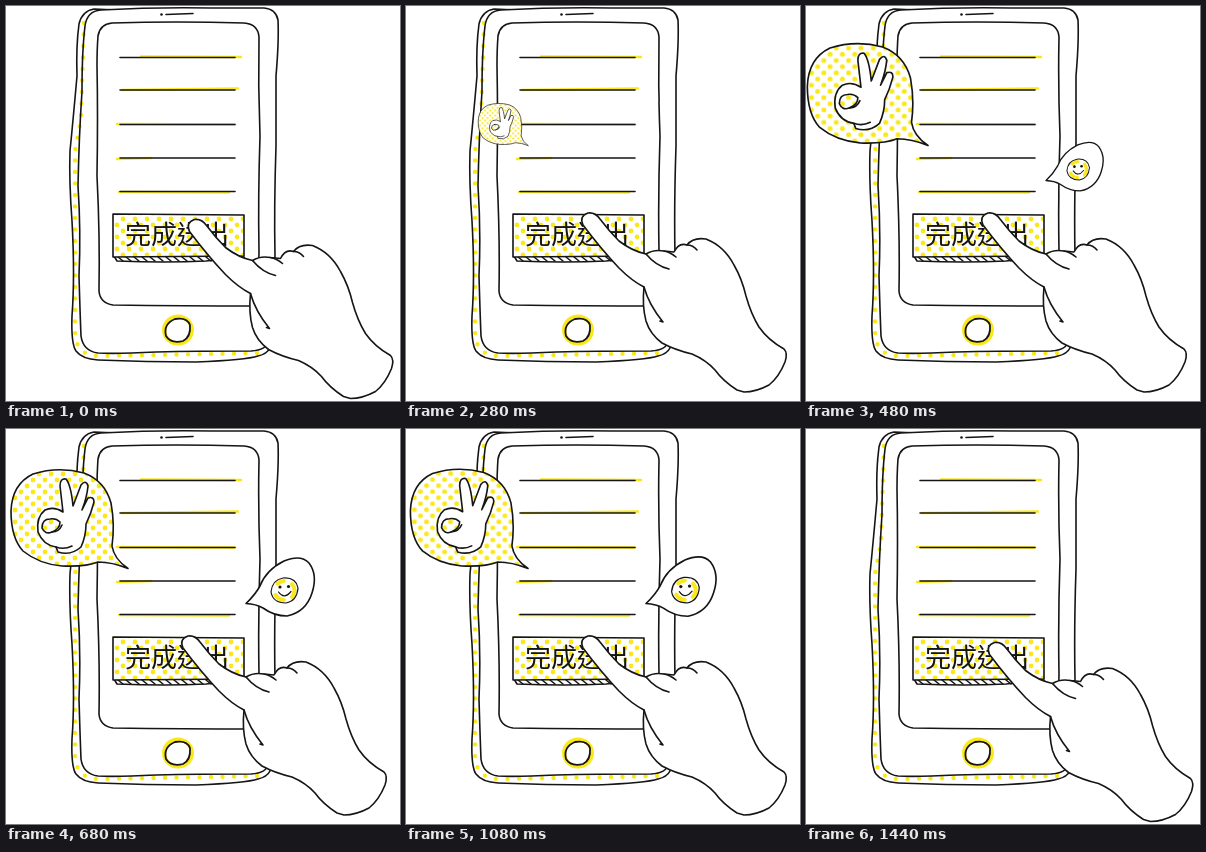
Animation of 394 by 395 pixels, one loop 1840 ms. Source, as an HTML page:

```html
<!DOCTYPE html>
<html lang="zh-Hant">
<head>
<meta charset="utf-8">
<style>
html, body { margin: 0; width: 100%; height: 100%; overflow: hidden; background: #fff; }
svg { display: block; width: 394px; height: 395px; }
.ink { fill: none; stroke: #151515; stroke-width: 1.6; stroke-linecap: round; stroke-linejoin: round; }
.white { fill: #fff; }
.dots { fill: url(#dots); }
.solid { fill: #151515; }
.mark { fill: none; stroke: #fbe81a; stroke-width: 2.5; stroke-linecap: round; }
.beads { stroke-width: 4.4; stroke-dasharray: 0 11.5; mix-blend-mode: multiply; }
.ring { stroke-width: 4; }
.thin { stroke-width: 1.2; }
text { font: 300 26px "Noto Sans CJK TC", "Noto Sans CJK", "Noto Sans CJK JP", sans-serif; fill: #151515; }
</style>
</head>
<body>
<svg viewBox="0 0 394 395">
  <defs>
    <pattern id="dots" width="12" height="12" patternUnits="userSpaceOnUse" fill="#fbe81a">
      <circle cx="3" cy="3" r="2.4"/><circle cx="9" cy="9" r="2.4"/>
    </pattern>
  </defs>

  <!-- phone -->
  <path class="ink white" d="M88 3Q76 5 73 18Q70 40 71 70Q67 115 64 145Q63 175 66 215Q69 270 66 310Q65 338 70 345Q76 353 92 354Q140 356 190 356Q240 354 252 350Q261 348 264 342L250 10Z"/>
  <path class="ink white" d="M95 4Q150 1 205 2L258 2Q270 3 272 14Q273 35 270 70Q270 105 270 140Q268 200 269 250L262 335Q261 344 245 345Q190 345 150 346Q110 348 92 347Q77 345 75 330Q74 305 73 270Q75 225 72 180Q73 130 76 85Q76 45 79 20Q81 5 95 4Z"/>
  <path class="mark beads" d="M78 17L75 113L69 145V325Q69 349 92 350L255 347"/>
  <path class="ink white" d="M106 17Q170 15 238 17Q252 18 253 31Q252 80 254 130Q252 190 253 245L252 300Q175 300 107 299Q94 297 93 285Q94 230 91 170Q92 110 91 60Q91 43 92 30Q94 18 106 17Z"/>
  <circle class="solid" cx="155.5" cy="8.5" r="1.3"/>
  <path class="ink" d="M160 8.5L187 7.5"/>

  <path class="mark" d="M135 50.5L235 51M116 84L232 82.500M111 118L229 118.5M111 153L145 152M113 186L223 186.5"/>
  <path class="ink" d="M114 51.5H229M114 84H229M114 118.5H229M114 152H229M114 185.5H229"/>

  <ellipse class="mark ring" cx="172" cy="324" rx="14" ry="13.5"/>
  <path class="ink" style="stroke-width:1.8" d="M169 313Q181 311 184 319Q185 331 177 335Q165 338 160 330Q157 318 169 313Z"/>

  <!-- button -->
  <path class="ink white" d="M108 250L111 255Q160 257 200 255L238 251"/>
  <path class="ink" id="hatch"/>
  <path class="white" d="M107 208L238 209V250L107 251Z"/>
  <path class="ink dots" d="M107 208L238 209V250L107 251Z"/>
  <text x="119" y="238">完成送出</text>

  <!-- bubble with the OK sign -->
  <g id="left">
    <path id="cloud" class="white" d="M122 139.500Q108 130 106 117Q109 96 105 74Q99 52 78 44Q52 37 27 45Q6 55 5 82Q5 109 17 122Q33 135 56 137Q80 138 92 133Q106 133 122 139.500Z"/>
    <path id="cloudInk" class="ink dots"/>
    <path class="ink white" fill-rule="evenodd" d="M57 83L54 57Q54 49 60 50Q65 56 67 77L75 56Q80 50 82 57Q81 68 76 81L82 69Q88 67 88 73Q85 85 80 95Q80 107 75 118Q65 127 52 123L50 118Q37 116 32 103Q30 88 39 81Q48 77 57 83ZM44 90Q36 90 36 99Q39 106 46 103Q54 100 54 93Q50 89 44 90Z"/>
    <path class="ink" d="M46 103Q53 103 56 96M50 118Q58 121 66 117"/>
  </g>

  <!-- smiley bubble -->
  <g id="right">
    <path class="ink white" d="M240 174.500Q249 166 254 157Q260 141 278 132Q295 125 303 134Q312 146 306 164Q300 183 281 187Q268 187 257 179Q250 175 240 174.500Z"/>
    <ellipse class="mark ring" stroke-dasharray="7 9 10 12" cx="278.5" cy="161.5" rx="10" ry="9.5"/>
    <path class="ink thin" d="M277 149Q290 148 292 159Q291 172 280 174Q267 174 265 163Q266 151 277 149ZM272.5 163Q278 171 285 162.5"/>
    <circle class="solid" cx="274" cy="158" r="1.6"/><circle class="solid" cx="282.5" cy="157.5" r="1.6"/>
  </g>

  <!-- pointing hand -->
  <g id="hand">
    <path class="ink white" d="M177 219Q173 210 182 207Q189 206 194 213Q203 225 213 235Q226 245 240 248Q248 243 258 245L268 246Q273 236 281 239Q287 231 300 233Q318 240 328 259Q336 273 340 290Q345 308 353 321Q362 334 378 343Q382 347 379 356Q373 371 363 379Q350 386 338 386L331 384Q317 375 309 364Q300 354 286 348Q269 344 256 337Q244 328 240 315Q236 300 238 281Q226 275 213 262Q195 243 177 219Z"/>
    <path class="ink" d="M238 281Q243 299 257 316L254 315M240 248Q250 260 263 263M258 245Q264 246 270 251M281 239Q287 239 291 244"/>
  </g>
</svg>
<script>
const LOOP = 1840, STEP = 40;
const el = id => document.getElementById(id);
const progress = (t, start, span) => Math.min(1, Math.max(0, (t - start) / span));
const backIn = p => 2 * p ** 3 - p * p;
const backOut = p => 1 - backIn(1 - p);
const smooth = p => p * p * (3 - 2 * p);

let hatch = "";
for (let x = 112; x < 236; x += 8) hatch += `M${x} 251l5 4`;
el("hatch").setAttribute("d", hatch);
el("cloudInk").setAttribute("d", el("cloud").getAttribute("d"));

function scaleAt(id, x, y, s) {
  const g = el(id);
  g.style.display = s > 0.01 ? "" : "none";
  g.setAttribute("transform", `translate(${x} ${y}) scale(${s}) translate(${-x} ${-y})`);
}

function pop(t, inStart, inSpan, outStart, outSpan) {
  return t < 900 ? backOut(progress(t, inStart, inSpan))
                 : 1 - backIn(progress(t, outStart, outSpan));
}

function draw(now) {
  const t = Math.floor((now % LOOP) / STEP) * STEP;
  const lift = 1 - smooth(progress(t, 0, 200)) + smooth(progress(t, 1260, 180));
  el("hand").setAttribute("transform", `translate(${6.5 * lift} ${6.5 * lift})`);
  scaleAt("left", 122, 139.5, pop(t, 240, 320, 900, 368));
  scaleAt("right", 240, 174.5, pop(t, 385, 295, 1012, 338));
}

const begin = performance.now();
function tick() {
  draw(performance.now() - begin);
  requestAnimationFrame(tick);
}
tick();
</script>
</body>
</html>
```
